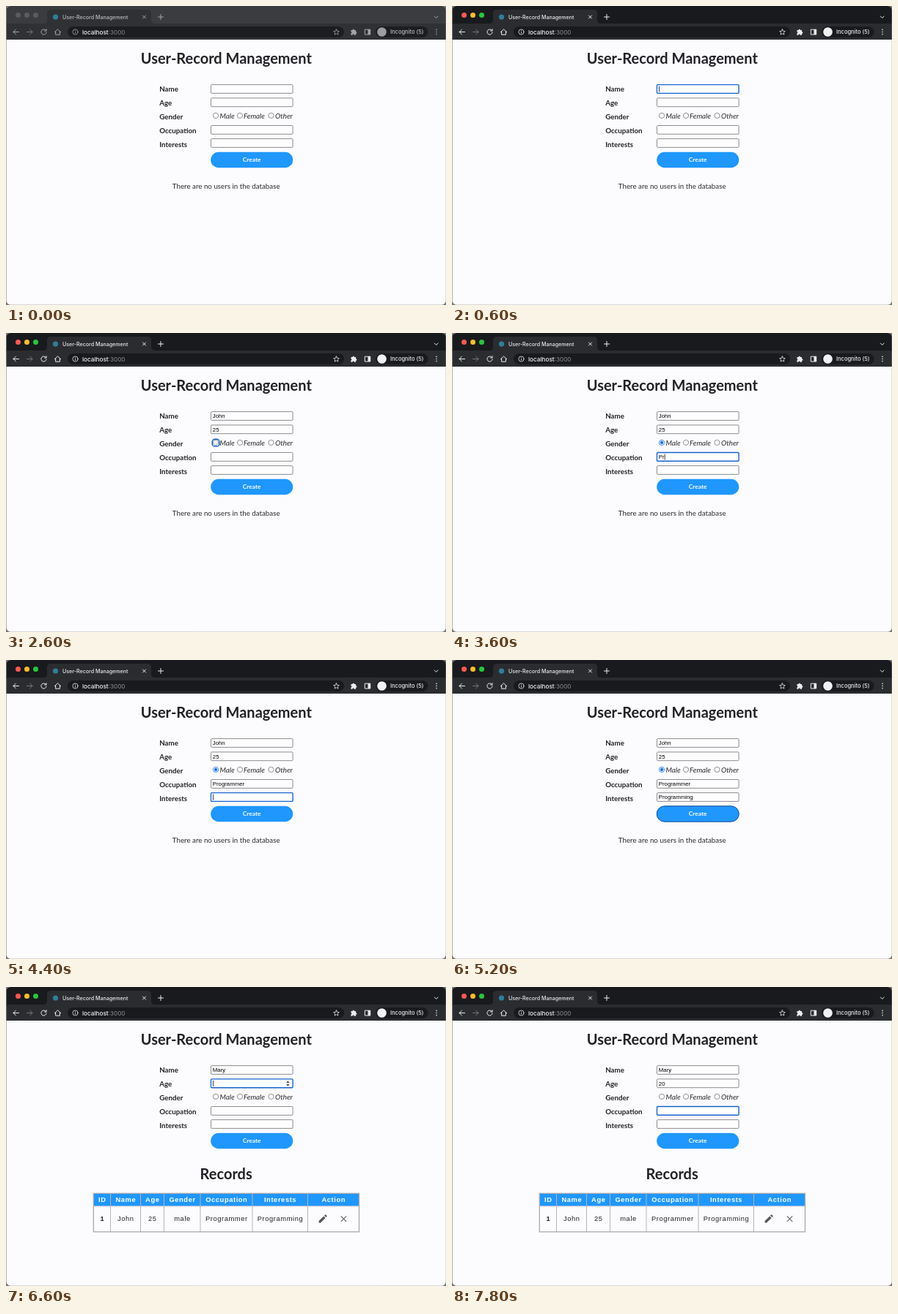
An HTML page that plays this animation: 600 by 409 pixels, repeating every 8 s.

```html
<!DOCTYPE html>
<html lang="en">
<head>
<meta charset="utf-8">
<title>User records</title>
<style>
  html, body { margin: 0; width: 100%; height: 100%; overflow: hidden; background: #77777a; }
  svg { display: block; }
  text { white-space: pre; }
  .ui { font-family: Inter, Roboto, sans-serif; font-weight: 500; }
  .page { font: 9.75px Lato, "Open Sans", sans-serif; fill: #2a2a2e; }
  .bold { font-weight: 700; fill: #222226; }
  .title { font-size: 20px; font-weight: 700; text-anchor: middle; fill: #222226; }
  .value { font: 7.8px "Liberation Sans", Arial, sans-serif; fill: #000; }
  .table { font: 9.36px "Liberation Sans", Arial, sans-serif; letter-spacing: .585px; text-anchor: middle; fill: #222226; }
  .table .head { font-weight: 700; fill: #fff; }
  .line { fill: none; stroke: var(--icon); stroke-width: 1; stroke-linecap: round; stroke-linejoin: round; }
  .box { fill: #fff; fill-opacity: .5; stroke: #808085; stroke-width: .9; }
  .box.focus { fill-opacity: 1; stroke: #1764cf; stroke-width: 1.4; }
  #window { --strip: #191a1d; --bar: #2b2c30; --omni: #191a1d; --icon: #ececee; --dim: #929398; --tab: #ececee; --badge: #f1f1f3; }
  #window.idle { --strip: #3b3c3f; --bar: #303135; --omni: #1c1d20; --icon: #a4a4a8; --dim: #88898d; --tab: #bcbcc0; --badge: #9d9da1; }
  .dot { fill: var(--light); }
  .idle .dot { fill: #5a5b5f; }
</style>
</head>
<body>
<svg id="stage" width="600" height="409" viewBox="0 0 600 409">
  <defs><clipPath id="frame"><rect x=".5" width="599.3" height="408.7" rx="5.5"/></clipPath></defs>
  <rect width="600" height="409" rx="5.5" fill="#6a6a6e"/>
  <g id="window" clip-path="url(#frame)">
    <rect width="600" height="409" fill="#fcfbfe"/>
    <rect width="600" height="25" style="fill:var(--strip)"/>
    <rect y="24" width="600" height="22" style="fill:var(--bar)"/>
    <path d="M51 24q5 0 5-5v-9q0-5 5-5h132q5 0 5 5v9q0 5 5 5z" style="fill:var(--bar)"/>
    <circle class="dot" cx="16.5" cy="12.6" r="3.5" style="--light:#fe5a52"/>
    <circle class="dot" cx="28.5" cy="12.6" r="3.5" style="--light:#fdbc2e"/>
    <circle class="dot" cx="40.5" cy="12.6" r="3.5" style="--light:#28c53f"/>
    <circle cx="67.5" cy="15" r="3.6" fill="#2f7f98"/>
    <g class="ui">
      <text x="77" y="17.6" font-size="7.1" style="fill:var(--tab)">User-Record Management</text>
      <rect x="84" y="28" width="377" height="15" rx="7.5" style="fill:var(--omni)"/>
      <text x="104" y="38.6" font-size="8.2" fill="#f4f4f6">localhost<tspan style="fill:var(--dim)" font-weight="400">:3000</tspan></text>
      <rect x="504" y="28" width="71.5" height="15" rx="7.5" style="fill:var(--omni)"/>
      <text x="524" y="38.4" font-size="7.5" style="fill:var(--tab)">Incognito (5)</text>
    </g>
    <circle cx="512.5" cy="35.5" r="6.3" style="fill:var(--badge)"/>
    <g class="line">
      <path d="M186.5 13l4 4m0-4l-4 4M207.5 15h7m-3.5-3.5v7M584.3 14l2.4 2.4 2.4-2.4"/>
      <path d="M17.5 35.5h-7.5m3.4-3.4l-3.4 3.4 3.4 3.4"/>
      <path d="M28.5 35.5h7.5m-3.4-3.4l3.4 3.4-3.4 3.4" style="stroke:#77787c"/>
      <path d="M54.5 33.5a3.6 3.6 0 1 0 .6 2.4M55 31.6v2.4h-2.4"/>
      <path d="M66.3 35.8l4.2-4 4.2 4M67.6 35v4.2h5.8V35"/>
      <g stroke-width=".8">
        <circle cx="94.5" cy="35.5" r="3.6"/><path d="M94.5 35.2v2M94.5 33.6v.1"/>
        <path d="M450.5 31.8l1.1 2.5 2.7.3-2 1.8.6 2.7-2.4-1.4-2.4 1.4.6-2.7-2-1.8 2.7-.3z"/>
      </g>
      <rect x="489.7" y="32.2" width="7" height="6.8"/>
    </g>
    <g style="fill:var(--icon)">
      <path d="M470.5 33h2a1.3 1.3 0 0 1 2.6 0h2v2.2a1.3 1.3 0 0 1 0 2.6v2h-2.3a1.2 1.2 0 0 0-2.4 0h-2v-2.2a1.3 1.3 0 0 0 0-2.5z"/>
      <rect x="493.5" y="32" width="3.5" height="7"/>
      <circle cx="587" cy="32.4" r=".8"/><circle cx="587" cy="35.5" r=".8"/><circle cx="587" cy="38.6" r=".8"/>
    </g>

    <g class="page">
      <text class="title" x="300.3" y="78.8">User-Record Management</text>
      <g id="form"></g>
      <rect id="create" x="279.2" y="199.8" width="112.1" height="21.4" rx="10.7" fill="#1f97fd"/>
      <text class="bold" x="335.2" y="213.3" font-size="8.4" text-anchor="middle" style="fill:#fff">Create</text>
      <text id="empty" x="300.2" y="249.7" text-anchor="middle">There are no users in the database</text>
    </g>

    <g id="records">
      <text class="page title" x="300.2" y="262.5" style="font-size:20px;font-weight:700">Records</text>
      <g id="table" class="table">
        <rect x="119.5" y="282.5" width="362" height="52.5" fill="#fcfbfe"/>
        <rect x="119.5" y="282.5" width="362" height="17" fill="#1f97fd"/>
      </g>
      <path d="M426.6 322.5v-2.4l6.6-6.6 2.4 2.4-6.6 6.6zM434 312.7l1.1-1.1q.5-.5 1 0l1.4 1.4q.5.5 0 1l-1.1 1.1z" fill="#57575b"/>
      <path d="M456.8 313.4l7.4 7.4m0-7.4l-7.4 7.4" stroke="#68686c" stroke-width="1.2"/>
    </g>

    <rect id="caret" width=".8" height="8" fill="#111"/>
    <path id="spin" d="M382.2 131l2.2-2.8 2.2 2.8zM382.2 133l2.2 2.8 2.2-2.8z" fill="#4a4a4e"/>
    <g id="menu" class="ui" font-size="7.5" fill="#f2f2f4"></g>
    <path id="pointer" d="M-1.7-4q1.7 0 1.7 1v6q0 1-1.7 1M1.7-4q-1.7 0-1.7 1v6q0 1 1.7 1M-1 .8h2" fill="none" stroke="#222" stroke-width=".9"/>
  </g>
</svg>
<script>
const LOOP = 8000, TICK = 200;
const $ = id => document.getElementById(id);

function add(parent, tag, attrs, text = '') {
  const el = document.createElementNS($('stage').namespaceURI, tag);
  for (const key in attrs) el.setAttribute(key, attrs[key]);
  el.textContent = text;
  parent.append(el);
  return el;
}

// Form
const form = $('form');
const fieldTop = { name: 107.6, age: 125.9, occupation: 163.5, interests: 181.6 };
const fields = {};
for (const id in fieldTop) {
  const y = fieldTop[id];
  fields[id] = {
    y,
    box: add(form, 'rect', { class: 'box', x: 279.5, y, width: 111.6, height: 11.8, rx: 1.2 }),
    text: add(form, 'text', { class: 'value', x: 281.8, y: y + 8.6 })
  };
}
['Name', 'Age', 'Gender', 'Occupation', 'Interests'].forEach((label, i) =>
  add(form, 'text', { class: 'bold', x: 209.2, y: 117 + i * 19 }, label));

const ring = add(form, 'rect', { x: 281.2, y: 145.3, width: 9.8, height: 9.8, rx: 3.6, fill: '#fff', stroke: '#1764cf', 'stroke-width': 1.5 });
const radios = [['Male', 286, 291.5], ['Female', 319, 324], ['Other', 361.5, 367]].map(([label, cx, x]) => {
  add(form, 'text', { x, y: 153.6, 'font-style': 'italic' }, label);
  return add(form, 'circle', { cx, cy: 149.9, r: 3.6, fill: '#fff', stroke: '#737378', 'stroke-width': .8 });
});
const mark = add(form, 'circle', { cx: 286, cy: 149.9, r: 2.1, fill: '#0b6fe0' });

// Records table
const table = $('table');
const edges = [119.5, 142.5, 183.5, 215.5, 265, 336, 411.5, 481.5];
const heads = ['ID', 'Name', 'Age', 'Gender', 'Occupation', 'Interests', 'Action'];
const row = ['1', 'John', '25', 'male', 'Programmer', 'Programming'];
heads.forEach((head, i) => {
  const x = (edges[i] + edges[i + 1]) / 2 + .3;
  add(table, 'text', { class: 'head', x, y: 294.2 }, head);
  if (row[i]) add(table, 'text', { x, y: 320.3, 'font-weight': i ? 400 : 700 }, row[i]);
  if (i) add(table, 'path', { d: `M${edges[i]} 282.5v52.5`, stroke: '#b4b4b8' });
});
add(table, 'path', { d: 'M119.5 299.8h362', stroke: '#b4b4b8', 'stroke-width': .7 });
add(table, 'rect', { x: 119.3, y: 282.3, width: 362.2, height: 52.6, fill: 'none', stroke: '#a9a9ad', 'stroke-width': 1.3 });

// Each step changes part of the state
const blank = { name: '', age: '', occupation: '', interests: '', male: false, menu: [], pointer: null };
const steps = [
  [0, { ...blank, active: false, focus: '', saved: false }],
  [400, { active: true }],
  [600, { focus: 'name' }],
  [1000, { name: 'J', menu: ['john', 'John Doe'] }],
  [1400, { name: 'Jo' }],
  [1600, { name: 'Joh' }],
  [1800, { name: 'John', menu: [] }],
  [2000, { focus: 'age' }],
  [2200, { age: '2', menu: ['20', '22', '23', '25', '28'] }],
  [2400, { age: '25', menu: [] }],
  [2600, { focus: 'radio' }],
  [3000, { male: true }],
  [3400, { focus: 'occupation' }],
  [3600, { occupation: 'Pr' }],
  [3800, { occupation: 'Progr' }],
  [4000, { occupation: 'Program' }],
  [4200, { occupation: 'Programmer' }],
  [4400, { focus: 'interests' }],
  [4600, { interests: 'Pro', menu: ['Programming'] }],
  [4800, { interests: 'Program' }],
  [5000, { interests: 'Programming', menu: [] }],
  [5200, { focus: 'create' }],
  [5400, { ...blank, saved: true }],
  [5600, { pointer: [365, 113] }],
  [5800, { pointer: [360, 113] }],
  [6000, { focus: 'name' }],
  [6200, { name: 'Ma', pointer: null }],
  [6400, { name: 'Mary' }],
  [6600, { focus: 'age' }],
  [7000, { age: '2' }],
  [7200, { age: '20' }],
  [7400, { focus: 'radio' }],
  [7800, { focus: 'occupation' }]
];

const show = (el, on) => { el.style.display = on ? '' : 'none'; };

function drawMenu(items, field) {
  const menu = $('menu');
  menu.replaceChildren();
  if (!items.length) return;
  const y = field.y + 17.5;
  const width = items[0].length > 8 ? 64 : 56.5;
  add(menu, 'path', { d: `M329.5 ${y + .5}l5.5-5 5.5 5z`, fill: '#232327' });
  add(menu, 'rect', { x: 323, y, width, height: 4.7 + items.length * 21.4, rx: 3, fill: '#232327' });
  items.forEach((item, i) => add(menu, 'text', { x: 330, y: y + 16 + i * 21.4 }, item));
}

function draw(time) {
  const state = {};
  for (const [start, change] of steps) if (start <= time) Object.assign(state, change);

  $('window').classList.toggle('idle', !state.active);
  for (const id in fields) {
    fields[id].text.textContent = state[id];
    fields[id].box.classList.toggle('focus', state.focus === id);
  }
  const field = fields[state.focus];
  show($('caret'), field && time % 1000 < 700);
  if (field) {
    $('caret').setAttribute('x', 282 + field.text.getComputedTextLength());
    $('caret').setAttribute('y', field.y + 2);
  }
  show($('spin'), state.focus === 'age');
  show(ring, state.focus === 'radio' && !state.saved);
  show(mark, state.male);
  radios[0].setAttribute('stroke', state.male ? '#0b6fe0' : '#737378');
  $('create').setAttribute('stroke', state.focus === 'create' ? '#174a9c' : 'none');
  show($('empty'), !state.saved);
  show($('records'), state.saved);
  drawMenu(state.menu, field);
  show($('pointer'), state.pointer);
  if (state.pointer) $('pointer').setAttribute('transform', `translate(${state.pointer})`);
}

let last = -1;
function tick() {
  const time = Math.floor(performance.now() % LOOP / TICK) * TICK;
  if (time !== last) draw(last = time);
  requestAnimationFrame(tick);
}
tick();
</script>
</body>
</html>
```
